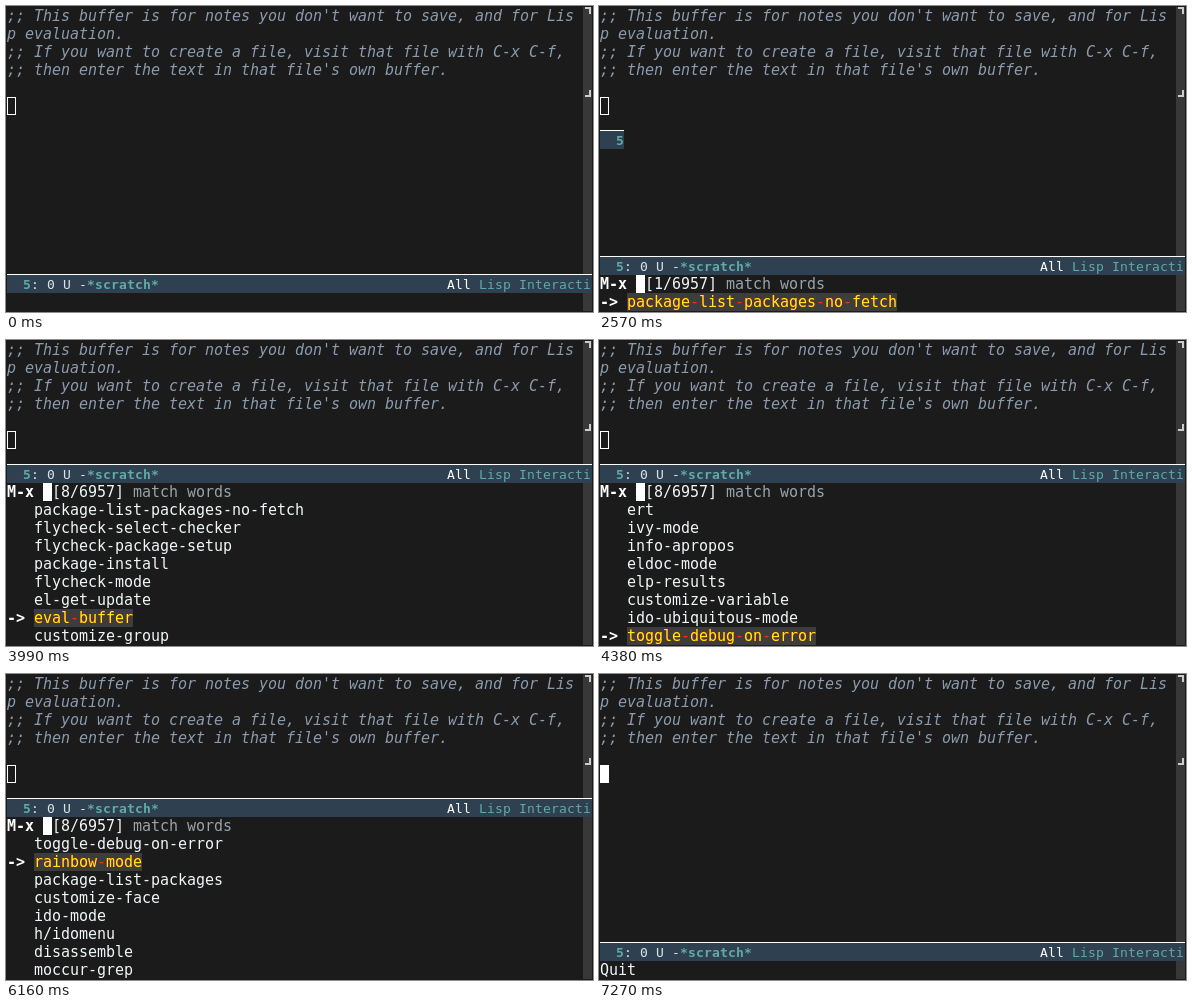
An HTML page for the animation above (7.76 s loop, 587 by 306 pixels).

```html
<!DOCTYPE html>
<html lang="en">
<head>
<meta charset="utf-8">
<title>Command completion</title>
<style>
html, body { margin: 0; width: 100%; height: 100%; overflow: hidden; background: #1b1b1b; }
#stage {
  position: relative; width: 587px; height: 306px; overflow: hidden;
  background: #1b1b1b; color: #f0f6f7; white-space: pre;
  font: 15px/18px "DejaVu Sans Mono", monospace;
  letter-spacing: calc(9px - 1ch); /* whole-pixel character cells */
}
#stage div, #screen > span { position: absolute; }
#screen { left: 0; top: 0; }
#notes { left: 1px; top: 1px; color: #8b9bad; font-style: italic; }
#fringe { left: 577px; top: 1px; width: 9px; height: 304px; background: #383838; }
.corner { left: 579px; width: 4px; height: 5px; border: 0 solid #ccc; border-right-width: 2px; }
.top { top: 1px; border-top-width: 2px !important; }
.bottom { top: 84px; border-bottom-width: 2px !important; }
.cursor { box-sizing: border-box; width: 9px; height: 18px; border: 1px solid #fff; }
.filled { background: #fff; }
.mode {
  left: 1px; width: 585px; height: 18px; overflow: hidden;
  border-top: 1px solid #fff; background: #2f4050; color: #dce3e8;
  font-size: 13px; line-height: 19px; letter-spacing: calc(8px - 1ch);
}
.mode b, .mode i { color: #5faaaa; font-style: normal; }
.mode span { position: absolute; left: 440px; color: #fff; }
.bold { font-weight: bold; color: #fff; }
.dim { color: #9ba3a8; }
.chosen { background: #3d3d3d; color: #ffee10; text-shadow: 0 0 1px #f00; }
.chosen u { color: #f82a18; text-decoration: none; }
</style>
</head>
<body>
<div id="stage">
<div id="notes">;; This buffer is for notes you don't want to save, and for Lis
p evaluation.
;; If you want to create a file, visit that file with C-x C-f,
;; then enter the text in that file's own buffer.</div>
<div id="fringe"></div><div class="corner top"></div><div class="corner bottom"></div>
<div id="screen"></div>
</div>
<script>
const LOOP = 7760, ROW = 18, VISIBLE = 8, LIST_TOP = 161;
const commands = `package-list-packages-no-fetch flycheck-select-checker flycheck-package-setup
  package-install flycheck-mode el-get-update eval-buffer customize-group ert ivy-mode
  info-apropos eldoc-mode elp-results customize-variable ido-ubiquitous-mode
  toggle-debug-on-error rainbow-mode package-list-packages customize-face ido-mode
  h/idomenu disassemble moccur-grep`.split(/\s+/);

const span = (x, y, cls, text = '') =>
  `<span class="${cls}" style="left:${x}px;top:${y}px">${text}</span>`;
const cursor = (x, y, filled) => span(x, y, filled ? 'cursor filled' : 'cursor');
const point = filled => cursor(1, 91, filled);

const modeLine = (y, width = 585) =>
  `<div class="mode" style="top:${y}px;width:${width}px">  <b>5</b>: 0 U -<b>*scratch*</b>` +
  `<span>All <i>Lisp Interaction</i></span></div>`;

const prompt = (y, count) => span(1, y, 'bold', 'M-x') + cursor(37, y, true) +
  (count ? span(46, y, '', `[${count}/6957]`) + span(127, y, 'dim', 'match words') : '');

const candidate = (y, name, chosen) => chosen
  ? span(1, y, 'bold', '-&gt;') + span(28, y, 'chosen', name.replace(/-/g, '<u>-</u>'))
  : span(28, y, '', name);

const listRows = (first, selected) => commands.slice(first, first + VISIBLE)
  .map((name, i) => candidate(LIST_TOP + i * ROW, name, first + i === selected));

const frames = [];
const show = (at, html) => frames.push({ at, html });
const showList = (at, rows) =>
  show(at, point(false) + modeLine(124) + prompt(143, 8) + rows.join(''));

let first = 0, selected = 0, rows = listRows(0, 0);

// With paintTime, the upper rows are repainted before the remaining ones.
function select(at, index, paintTime = 0) {
  const scrolls = index < first || index >= first + VISIBLE;
  first = Math.min(index, Math.max(first, index - VISIBLE + 1));
  selected = index;
  const next = listRows(first, selected);
  if (paintTime) {
    const cut = scrolls ? VISIBLE / 2 : selected - first + 1;
    showList(at, [...next.slice(0, cut), ...rows.slice(cut)]);
  }
  rows = next;
  showList(at + paintTime, rows);
}

// Opening the prompt
show(0, point(false) + modeLine(268));
show(1110, point(true) + modeLine(268));
show(1970, point(false) + modeLine(268) + prompt(287));
const single = point(false) + modeLine(250) + prompt(269, 1) + candidate(287, commands[0], true);
show(2020, single);
show(2570, single + modeLine(124, 24));
showList(2620, rows);

// Down: one press, key repeat, one press
select(3190, 1);
const repeatStart = 3830;
for (const at of [3830, 3870, 3910, 3950, 3990, 4040, 4090, 4140, 4190,
                  4230, 4280, 4330, 4380, 4430, 4470, 4510])
  select(at, 2 + Math.floor((at - repeatStart) / 40));
select(4560, 21);
select(4750, 22, 50);

// Up: separate presses
for (const [at, paintTime] of [[5230, 40], [5410, 40], [5590, 40], [5760], [5940], [6120, 40],
                               [6290], [6480, 40], [6650, 40], [6830, 40], [6980]])
  select(at, selected - 1, paintTime);

// Quitting
show(7220, point(false) + modeLine(268));
show(7270, point(true) + modeLine(268) + span(1, 287, '', 'Quit'));

const screenBox = document.getElementById('screen');
const start = performance.now();
let current;
function draw() {
  const t = (performance.now() - start) % LOOP;
  const frame = frames.findLast(f => f.at <= t) || frames[0];
  if (frame !== current) {
    current = frame;
    screenBox.innerHTML = frame.html;
  }
  requestAnimationFrame(draw);
}
draw();
</script>
</body>
</html>
```
